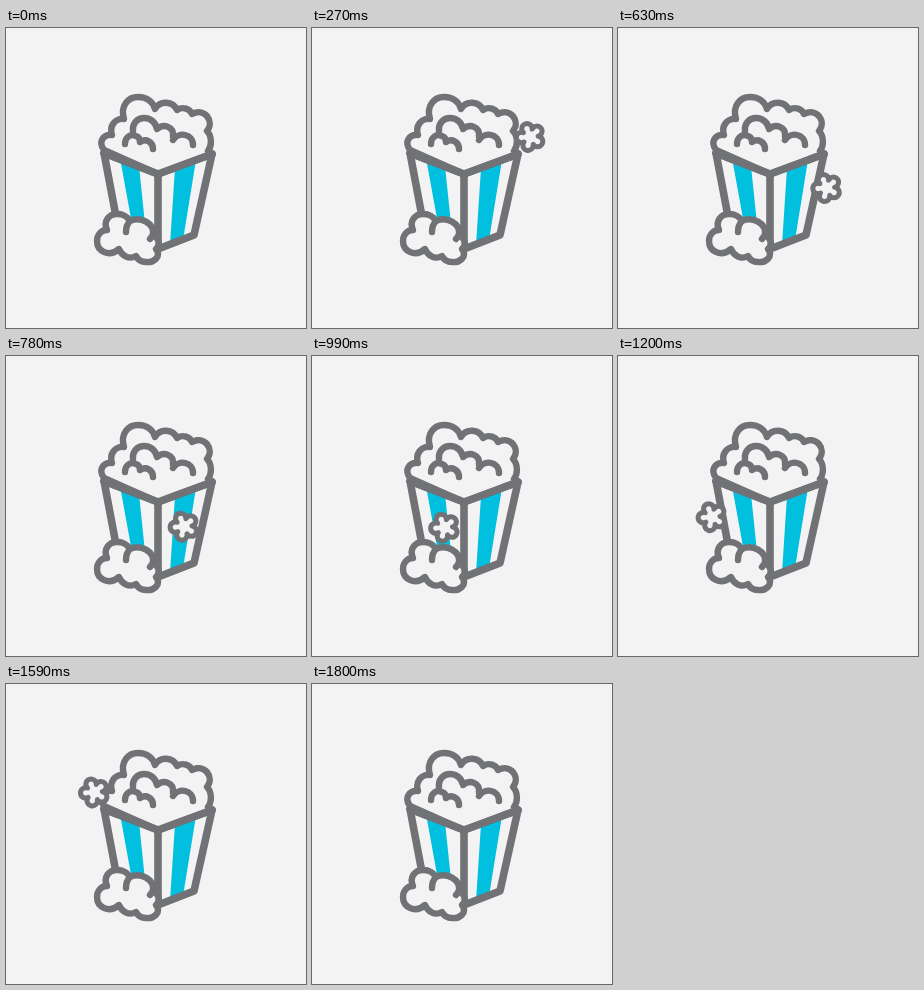
An HTML page for the animation above (1.87 s loop, 300 px wide and 300 px high).

```html
<!DOCTYPE html>
<html lang="en">
<head>
<meta charset="utf-8">
<title>Popcorn</title>
<style>
  html, body { margin: 0; width: 100%; height: 100%; overflow: hidden; background: #f3f3f3; }
  svg { display: block; width: 100vw; height: 100vh; }
  .line { fill: #f3f3f3; stroke: #717276; stroke-width: 6.4; stroke-linecap: round; stroke-linejoin: round; }
  .open { fill: none; }
  .tub { stroke-width: 7.6; }
  .teal { fill: #00bfdf; }
</style>
</head>
<body>
<svg viewBox="0 0 300 300">
  <!-- tub -->
  <path class="teal" d="M114 130 L133 138 L139 196 L126 196Z M169 140 L190 132 L177 212 L164 217Z"/>
  <path class="line open tub" d="M98 125 L112 199 L152 221 L188 207 L206 126 L152 146Z M152 146 V221"/>

  <!-- heap -->
  <path class="line" d="M98 122 C92 114 97 106 106 107 C103 98 109 90 118 91
    C114 78 122 69 132 69 C141 69 147 74 149 81 C154 72 167 73 171 82
    C177 78 184 81 186 86 C198 79 209 93 201 103
    C206 108 206 118 202 123 L206 126 L152 146Z"/>
  <path class="line open tub" d="M98 125 L152 146 L206 126"/>
  <path class="line open" d="M127 103 C126 96 131 90 138 90 C145 90 150 95 151 101
    C158 95 168 99 167 108 M167 112 C173 103 187 106 187 117
    M119 116 C119 109 125 105 130 108 C133 109 134 112 134 114 C140 110 147 114 147 121"/>

  <g id="puff" class="line" style="stroke-width:5"></g>

  <!-- piece on the ground -->
  <path class="line" d="M113 221 C103 230 91 223 91 213 C91 207 95 202 101 202
    C97 193 103 186 111 186 C117 186 122 189 124 193 C134 188 149 195 147 207
    C154 211 154 217 150 221 C156 229 147 235 140 234 C135 234 132 232 130 228
    C123 232 116 228 113 221Z"/>
  <path class="line open" d="M124 193 C121 196 120 200 120 204 M147 207 L144 211"/>
</svg>
<script>
const LOOP = 1870, STEP = 30, START = 30, END = 1800;
const puff = document.getElementById("puff");

// time, x, y along the orbit
const keys = [
  [30, 193, 98], [300, 221, 111], [480, 233.5, 133], [540, 226, 150],
  [780, 178, 170.5], [990, 132.5, 171.5], [1200, 94, 161],
  [1410, 70.5, 133.5], [1620, 93, 105], [1770, 126, 98]
];

// closed ring of five round lobes
function drawPuff() {
  let outline = "";
  for (let i = 0; i <= 5; i++) {
    const a = (i * 72 - 4) * Math.PI / 180;
    const notch = (8 * Math.cos(a)).toFixed(2) + " " + (8 * Math.sin(a)).toFixed(2);
    outline += (i ? "A5.2 5.2 0 1 1 " : "M") + notch;
  }
  puff.innerHTML = `<path d="${outline}Z"/>`;
}

function slope(i, axis) {
  const a = keys[Math.max(i - 1, 0)], b = keys[Math.min(i + 1, keys.length - 1)];
  return (b[axis] - a[axis]) / (b[0] - a[0]);
}

// cubic Hermite curve through the keys
function place(t, axis) {
  let i = 0;
  while (i < keys.length - 2 && t > keys[i + 1][0]) i++;
  const a = keys[i], b = keys[i + 1], span = b[0] - a[0];
  const u = Math.min(1, Math.max(0, (t - a[0]) / span)), v = 1 - u;
  return v * v * (1 + 2 * u) * a[axis] + u * u * (3 - 2 * u) * b[axis]
    + span * u * v * (v * slope(i, axis) - u * slope(i + 1, axis));
}

function render(now) {
  const t = Math.floor(now % LOOP / STEP) * STEP;
  const shown = t >= START && t < END;
  puff.setAttribute("opacity", shown ? Math.min(1, t / 90, (END - t) / 90) : 0);
  puff.setAttribute("transform", `translate(${place(t, 1)} ${place(t, 2)})`);
}

function tick() {
  render(performance.now() - begin);
  requestAnimationFrame(tick);
}

drawPuff();
const begin = performance.now();
tick();
</script>
</body>
</html>
```
